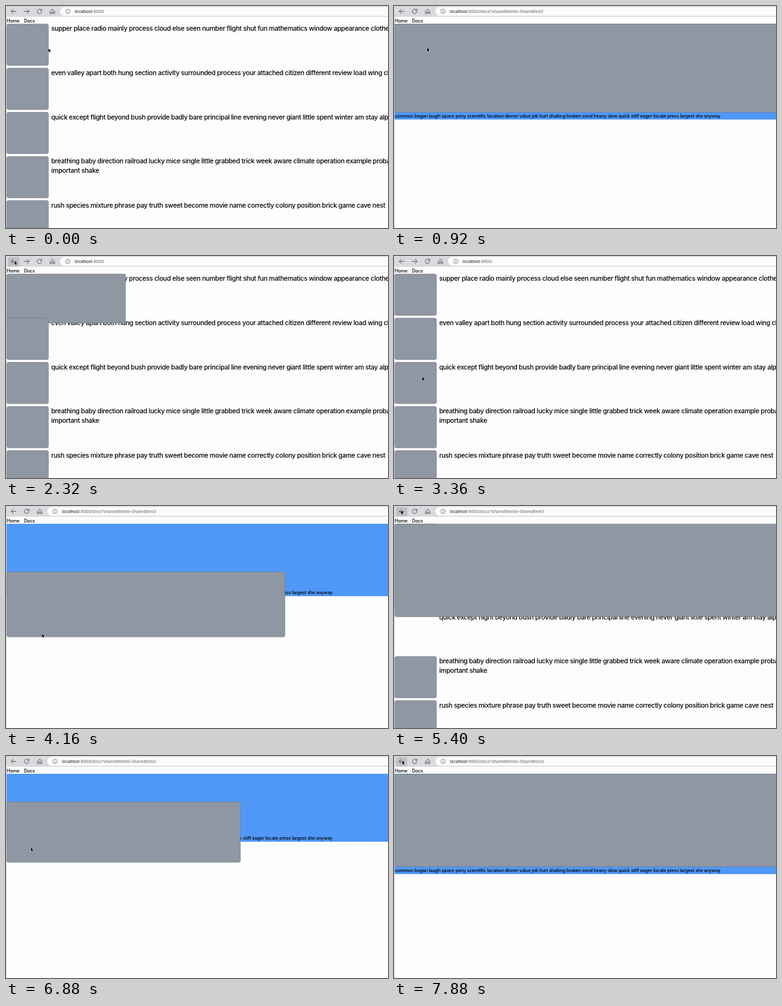
An HTML page with a canvas for the animation above (8000 ms loop, 600 by 350 pixels).

```html
<!DOCTYPE html>
<html lang="en">
<head>
<meta charset="utf-8">
<title>Shared element transition</title>
<style>
  html, body { margin: 0; width: 100%; height: 100%; overflow: hidden; background: #fdfdfd; }
  canvas { display: block; width: 600px; height: 350px; }
</style>
</head>
<body>
<canvas id="stage"></canvas>
<script>
const LOOP = 8000, MORPH = 450;
const canvas = document.getElementById('stage');
const ctx = canvas.getContext('2d');
const dpr = window.devicePixelRatio || 1;
canvas.width = 600 * dpr;
canvas.height = 350 * dpr;

const rows = [
  ['supper place radio mainly process cloud else seen number flight shut fun mathematics window appearance clothes'],
  ['even valley apart both hung section activity surrounded process your attached citizen different review load wing chair'],
  ['quick except flight beyond bush provide badly bare principal line evening never giant little spent winter am stay alphabet'],
  ['breathing baby direction railroad lucky mice single little grabbed trick week aware climate operation example probably',
   'important shake'],
  ['rush species mixture phrase pay truth sweet become movie name correctly colony position brick game cave nest']
];
const docsText = 'common began laugh space pony scientific location dinner value job hurt shaking ' +
  'broken send heavy slow quick stiff eager locate press largest she anyway';

const TOP = 28, PITCH = 69.6, THUMB = 66, HERO_W = 880, HERO_H = 147;
const GREY = '#8f97a3', BLUE = '#5098f8';

// Each navigation: when the page swaps, when the morph begins, which row, and the direction.
const visits = [
  { at: 0, morph: -MORPH, row: 0, docs: false },
  { at: 645, morph: 645, row: 0, docs: true },
  { at: 2083, morph: 2083, row: 0, docs: false },
  { at: 4027, morph: 4027, row: 2, docs: true },
  { at: 5400, morph: 5425, row: 2, docs: false },
  { at: 6759, morph: 6759, row: 1, docs: true }
];
const STALL = { from: 5400, to: 5520 };

// Pointer tip: [time, x, y]
const pointerPath = [
  [0, 66.5, 66.7], [40, 66.5, 66.7], [200, 52, 65.7], [1100, 52, 65.7], [1950, 13.6, 7.7],
  [2360, 13.6, 7.7], [2720, 44, 190], [3320, 44, 190], [3900, 56.5, 201.2], [4480, 56.5, 201.2],
  [5000, 11, 6.7], [6160, 11, 6.7], [6700, 39, 144.2], [7200, 39, 144.2],
  [7760, 13, 7.2], [LOOP, 13, 7.2]
];

const lerp = (a, b, k) => a + (b - a) * k;
const clamp01 = v => Math.min(1, Math.max(0, v));

// cubic-bezier(0.4, 0, 0.1, 1)
function ease(x) {
  if (x <= 0 || x >= 1) return clamp01(x);
  let lo = 0, hi = 1;
  for (let i = 0; i < 24; i++) {
    const s = (lo + hi) / 2, r = 1 - s;
    if (1.2 * r * r * s + 0.3 * r * s * s + s * s * s < x) lo = s; else hi = s;
  }
  return lo * lo * (3 - 2 * lo);
}

function pointerAt(t) {
  const i = pointerPath.findIndex(p => p[0] > t);
  const [t0, x0, y0] = pointerPath[i - 1], [t1, x1, y1] = pointerPath[i];
  const k = (t - t0) / (t1 - t0), s = k * k * (3 - 2 * k);
  return [lerp(x0, x1, s), lerp(y0, y1, s)];
}

function rect(x, y, w, h, fill) {
  ctx.fillStyle = fill;
  ctx.fillRect(x, y, w, h);
}

function roundRect(x, y, w, h, r, fill, stroke) {
  ctx.beginPath();
  ctx.roundRect(x, y, w, h, r);
  ctx.fillStyle = fill;
  ctx.fill();
  if (stroke) {
    ctx.strokeStyle = stroke;
    ctx.lineWidth = 0.7;
    ctx.stroke();
  }
}

function text(str, x, y, size, spacing = 0, fill = '#000') {
  ctx.font = `500 ${size}px Inter, sans-serif`;
  ctx.letterSpacing = `${spacing}px`;
  ctx.fillStyle = fill;
  ctx.fillText(str, x, y);
  return x + ctx.measureText(str).width;
}

function icon(d, x, y, color = '#4c4e52') {
  ctx.save();
  ctx.translate(x, y);
  ctx.strokeStyle = color;
  ctx.lineWidth = 0.9;
  ctx.lineCap = ctx.lineJoin = 'round';
  ctx.stroke(new Path2D(d));
  ctx.restore();
}

const icons = {
  back: 'M4 0H-3.8M-.4 -3.4L-3.8 0L-.4 3.4',
  forward: 'M-4 0H3.8M.4 -3.4L3.8 0L.4 3.4',
  reload: 'M3.5 .2A3.5 3.5 0 1 1 2.5 -2.5L3.4 -1.6M3.5 -3.6V-1.5H1.4',
  home: 'M-3.3 -.4L0 -3.5L3.3 -.4V3.5H1.1V.8H-1.1V3.5H-3.3Z',
  info: 'M3.5 0A3.5 3.5 0 1 1 -3.5 0A3.5 3.5 0 1 1 3.5 0M0 -.3V1.7M0 -1.7V-1.6'
};

function drawToolbar(docs, row, hover) {
  const shift = docs ? 0 : 20;
  rect(0, 0, 600, 17, '#d9dade');
  if (hover) roundRect(3, 1.5, 18, 15, 2, '#bfc1c6');
  roundRect(65 + shift, 1.5, 600, 14, 7, '#fbfbfc');
  icon(icons.back, 12, 8.5);
  if (!docs) icon(icons.forward, 32.5, 8.5);
  icon(icons.reload, 32.5 + shift, 8.5);
  icon(icons.home, 53 + shift, 8.5);
  icon(icons.info, 77 + shift, 8.5, '#85878b');
  const end = text('localhost', 88 + shift, 10.9, 6.3, 0, '#2c2d30');
  text(':8000' + (docs ? `/docs?sharedItemId=SharedItem${row + 1}` : ''), end, 10.9, 6.3, 0, '#74767a');
}

function drawBox(row, p) {
  const y = lerp(TOP + row * PITCH, TOP, p);
  roundRect(1.4, y + 0.4, lerp(THUMB, HERO_W, p) - 0.8, lerp(THUMB, HERO_H, p) - 0.8, 2.5, GREY, '#747b86');
}

function drawHome(row, p) {
  rows.forEach((lines, i) => lines.forEach((line, n) =>
    text(line, 71, TOP + i * PITCH + 11.3 + n * 14.5, 10.3, -0.29)));
  rows.forEach((_, i) => drawBox(i, i === row ? p : 0));
}

function drawDocs(row, p) {
  const height = lerp(THUMB, HERO_H, p);
  rect(1, TOP, 599, height + 11.2, BLUE);
  text(docsText, 1.3, TOP + height + 8.2, 7.22, -0.17);
  drawBox(row, p);
}

function drawPointer(x, y) {
  ctx.save();
  ctx.translate(x, y);
  const arrow = new Path2D('M0 0V5.9L1.3 4.8L2.2 6.8L3.2 6.4L2.3 4.4H4.1Z');
  ctx.strokeStyle = '#fff';
  ctx.lineWidth = 0.8;
  ctx.stroke(arrow);
  ctx.fillStyle = '#000';
  ctx.fill(arrow);
  ctx.restore();
}

function draw(clock) {
  const stalled = clock >= STALL.from && clock < STALL.to;
  const t = stalled ? STALL.from : clock;
  const { morph, row, docs } = visits.findLast(v => v.at <= t);
  const k = ease((t - morph) / MORPH);
  const p = docs ? k : 1 - k;
  const [px, py] = pointerAt(t);

  ctx.setTransform(dpr, 0, 0, dpr, 0, 0);
  rect(0, 0, 600, 350, '#fdfdfd');
  rect(0, 17, 1, 333, '#cfd0d3');
  drawToolbar(docs || stalled, row, px < 21 && py < 16);
  text('Home', 1.2, 25.5, 7.22, -0.13);
  text('Docs', 28.2, 25.5, 7.22, -0.13);
  (docs ? drawDocs : drawHome)(row, p);
  drawPointer(px, py);
}

function tick() {
  draw(performance.now() % LOOP);
  requestAnimationFrame(tick);
}
tick();
</script>
</body>
</html>
```
